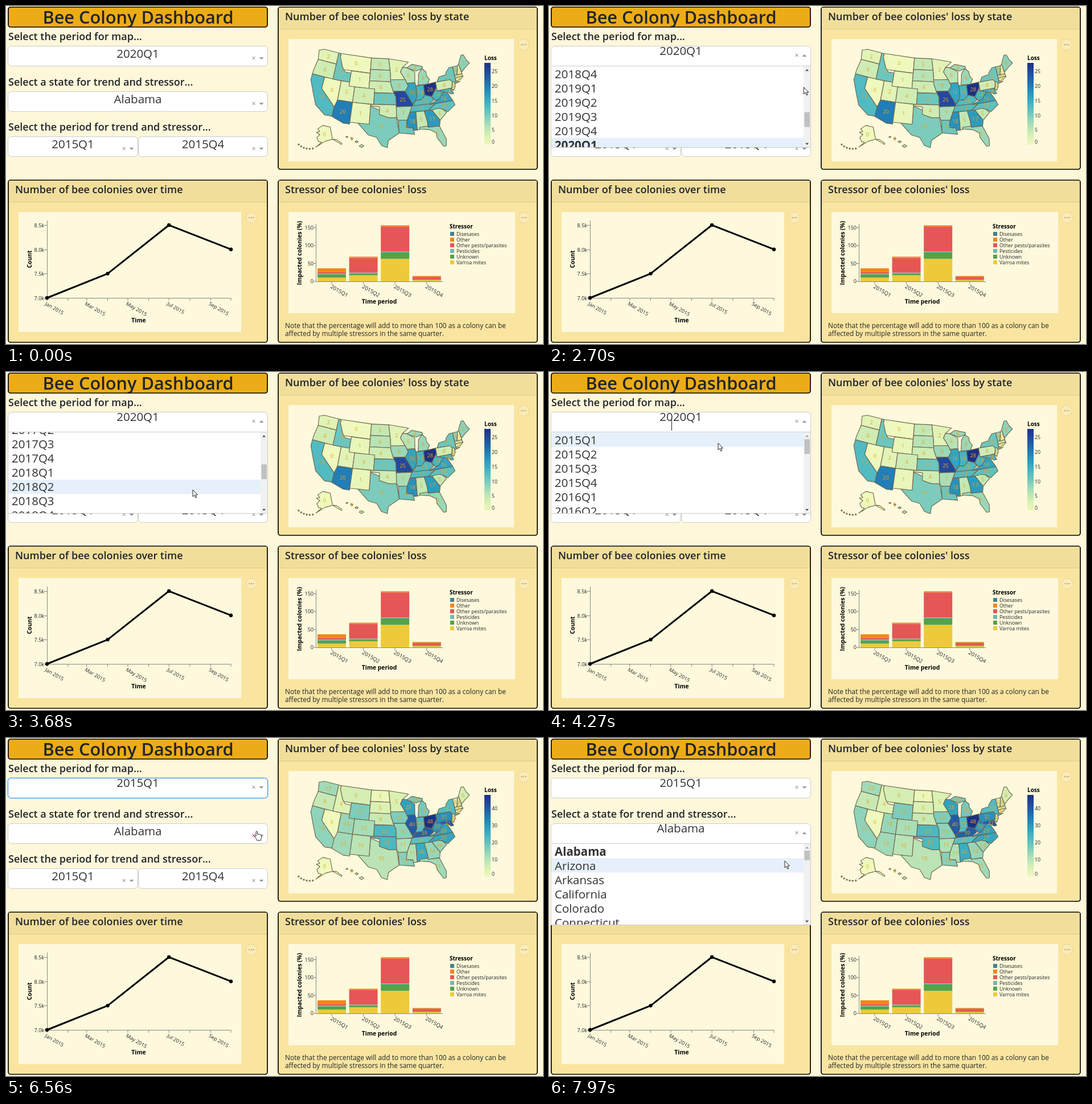
Write an HTML page with a canvas that moves like this. It is 943 px wide and 594 px high and loops after 8 s.

```html
<!DOCTYPE html>
<html lang="en">
<head>
<meta charset="utf-8">
<title>Bee Colony Dashboard</title>
<style>
  html, body { margin: 0; width: 100%; height: 100%; overflow: hidden; background: #fef7da; }
  canvas { display: block; }
</style>
</head>
<body>
<canvas id="stage" width="943" height="594"></canvas>
<script>
const ctx = document.getElementById('stage').getContext('2d');
const FONT = '"Open Sans", "Noto Sans", sans-serif';
const INK = '#212529', PANEL = '#fef9dc', LOOP = 8000;

// Moments of the story, in ms
const OPEN_PERIOD = 1960, PICK_PERIOD = 4600, MAP_OUT = 4650, MAP_IN = 5620, OPEN_STATE = 7150;

// ---------- drawing helpers ----------
function text(str, x, y, size, { weight = 400, color = INK, align = 'left', turn = 0 } = {}) {
  ctx.save();
  ctx.translate(x, y);
  ctx.rotate(turn * Math.PI / 180);
  ctx.font = `${weight} ${size}px ${FONT}`;
  ctx.fillStyle = color;
  ctx.textAlign = align;
  ctx.fillText(str, 0, 0);
  ctx.restore();
}
function rect(x, y, w, h, color) {
  ctx.fillStyle = color;
  ctx.fillRect(x, y, w, h);
}
function paint(fill, stroke, width = 1) {
  ctx.fillStyle = fill;
  ctx.fill();
  ctx.strokeStyle = stroke;
  ctx.lineWidth = width;
  ctx.stroke();
}
function box(x, y, w, h, r, fill, stroke, width) {
  ctx.beginPath();
  ctx.roundRect(x, y, w, h, r);
  paint(fill, stroke, width);
}
function trace(points, closed) {
  ctx.beginPath();
  points.forEach(p => ctx.lineTo(...p));
  if (closed) ctx.closePath();
}
function line(points, color, width = 1) {
  trace(points);
  ctx.strokeStyle = color;
  ctx.lineWidth = width;
  ctx.stroke();
}
function triangle(x, y, w, h, color) {
  trace([[x - w / 2, y - h / 2], [x + w / 2, y - h / 2], [x, y + h / 2]]);
  ctx.fillStyle = color;
  ctx.fill();
}
function dot(x, y, r, color) {
  ctx.beginPath();
  ctx.arc(x, y, r, 0, 7);
  ctx.fillStyle = color;
  ctx.fill();
}

// ---------- map ----------
// Albers equal-area conic; longitudes are degrees west
function conic(lat1, lat2, lon0, lonC, latC, scale, tx, ty) {
  const rad = Math.PI / 180, s1 = Math.sin(lat1 * rad);
  const n = (s1 + Math.sin(lat2 * rad)) / 2, c = 1 - s1 * s1 + 2 * n * s1;
  const raw = (lon, lat) => {
    const rho = Math.sqrt(c - 2 * n * Math.sin(lat * rad)) / n, a = n * (lon0 - lon) * rad;
    return [rho * Math.sin(a), rho * Math.cos(a)];
  };
  const [cx, cy] = raw(lonC, latC);
  return ([lon, lat]) => {
    const [x, y] = raw(lon, lat);
    return [tx + scale * (x - cx), ty + scale * (y - cy)];
  };
}
const K = 386, MX = 674.5, MY = 162.4;
const mainland = conic(29.5, 45.5, 96, 96.6, 38.7, K, MX, MY);
const alaska = conic(55, 65, 154, 156, 58.5, K * .35, MX - .307 * K, MY + .201 * K);
const hawaii = conic(8, 18, 157, 160, 19.9, K, MX - .205 * K, MY + .212 * K);

function centroid(ring) {
  let area = 0, x = 0, y = 0;
  ring.forEach(([x1, y1], i) => {
    const [x2, y2] = ring[(i + 1) % ring.length], cross = x1 * y2 - x2 * y1;
    area += cross;
    x += (x1 + x2) * cross;
    y += (y1 + y2) * cross;
  });
  return [x / area / 3, y / area / 3];
}

// A border runs north to south through lon,lat points; a plain number is a meridian
const border = b => typeof b === 'number' ? [[b, 90], [b, 0]] : b.split(' ').map(p => p.split(',').map(Number));
function crossing(points, lat) {
  const i = points.findIndex(p => p[1] <= lat);
  if (i < 1) return i ? points.at(-1) : points[0];
  const [[x0, y0], [x1, y1]] = points.slice(i - 1, i + 1);
  return [x0 + (x1 - x0) * (lat - y0) / (y1 - y0), lat];
}
const section = (points, north, south) =>
  [crossing(points, north), ...points.filter(p => p[1] < north && p[1] > south), crossing(points, south)];

const states = [];
const addState = (ring, late, early) => states.push({ ring, late, early, label: centroid(ring) });
// Stacks states between two borders; each row gives its southern latitude and losses in both periods
function column(west, east, north, rows, project = mainland) {
  const [w, e] = [west, east].map(border);
  for (const [south, late, early] of rows) {
    addState([...section(w, north, south), ...section(e, north, south).reverse()].map(project), late, early);
    north = south;
  }
}

const PACIFIC = '122.8,49 124.7,48.4 124,46 124.5,43 124.4,40.4 122.5,37.5 120.6,34.5 117.1,32.5';
const SIERRA = '120,42 120,39 114.6,35 114.6,32.6';
const ROCKIES = '116,49 116,48 114.4,45.5 113.3,44.5 111,44.4 111,42';
const PLAINS = '97.2,49 96.5,45 96.4,42.5 95.5,40.5 94.6,39 94.5,33.7 94,33 93.8,29.7';
const RIVER = '89.6,48 92,46.7 92.8,45.5 91.2,43.5 90.2,41.8 91.4,40.4 90.2,38.7 89.1,37 90.2,35 91.2,33 91.6,31.1 89.6,30.9 89.2,29.1';
const LAKE = '90.4,46.6 87.5,45.3 87.8,42.5 87.5,41.7 87.5,39 88.1,37.9 89.1,37';

column(PACIFIC, 117, 49, [[46, 2, 13], [42, 4, 8]]);
column(PACIFIC, SIERRA, 42, [[32.5, 13, 15]]);
column(SIERRA, 114, 42, [[35, 0, 0]]);
column(117, ROCKIES, 49, [[42, 11, 4]]);
column(ROCKIES, 104, 49, [[45, 0, 6]]);
column(114, 109, 42, [[37, 2, 14]]);
column('114,37 114.7,35 114.8,32.5 111,31.3', 109, 37, [[31.3, 20, 13]]);
column(111, 104, 45, [[41, 1, 17]]);
column('103,36.5 103,32.1 106.5,31.8 103,29 100.5,28.5 99,26.4 97.3,25.9', '94.5,33.7 93.8,29.7 97,27.8 97.3,25.9', 36.5, [[25.9, 10, 10]]);
column(104, PLAINS, 49, [[46, 5, 1], [43, 6, 5], [40, 4, 8]]);
column(109, 102, 41, [[37, 4, 12]]);
column(109, 103, 37, [[31.8, 1, 10]]);
column(102, PLAINS, 40, [[37, 11, 23]]);
column('103,37 103,36.6 100,36.4 100,34.5 97,33.7', PLAINS, 37, [[33.7, 4, 23]]);
column(PLAINS, RIVER, 49, [[43.5, 2, 5], [40.5, 8, 17], [36.5, 25, 15], [33, 7, 11], [29.2, 11, 16]]);
column(RIVER, LAKE, 46.7, [[42.5, 6, 28], [37, 16, 40]]);
column('88.5,47.3 90.4,46.5 87,45.5', '88,47.3 84.5,46.5 84.5,46 87,45.5', 47.3, [[45.5, '', 18]].map(([s, a, b]) => [s, 8, b]));
column('85,45.8 86.2,44.7 86.5,43 86.8,41.8', '84.5,45.8 83.4,45 83.4,44 82.5,43 83.4,41.8', 45.8, [[41.8, 8, 18]]);
column('84.8,39.1 86,38 88,37.9 89.4,36.5', '84.8,39.1 82.6,38.4 82,37.5 83.7,36.6', 39.1, [[36.6, 13, 39]]);
column(RIVER, '81.7,36.6 84.3,35', 36.6, [[35, 13, 21]]);
column(LAKE, '84.8,41.7 84.8,39.1 86,38', 41.7, [[38, 14, 22]]);
column('84.8,41.7 84.8,39.1 82.3,38.4', '80.5,42 80.5,40.6 82.2,38.4', 42, [[38.4, 28, 48]]);
column(RIVER, 88.3, 35, [[30.2, 18, 11]]);
column('87.5,31 87.5,30.4 84.5,30 82.8,29 82.7,27.7 81.2,25.2', '85,31 84.9,30.7 81.5,30.6 80.1,27 80.4,25.2', 31, [[25.2, 8, 13]]);
column(88.3, '85.6,35 85,32.3 85,31 87.5,30.9 87.6,30.3', 35, [[30.3, 5, 26]]);
column('81.7,36.5 84.3,35 81,34.9 79.7,34.8 78.2,33.9', '75.9,36.5 75.5,35.3 78.2,33.9', 36.5, [[33.9, 12, 27]]);
column('85.6,35 85,32.3 84.9,30.7', '83.1,35 81,32.1 81.4,30.7', 35, [[30.7, 17, 14]]);
column('83.1,35 81,32.1', '81,35.2 79.7,34.8 78.6,33.8 81,32.1', 35.2, [[32.1, 5, 14]]);
column('78.4,39.4 80.3,37.5 83.7,36.5', '77.5,39.3 77,38.5 75.9,36.5', 39.4, [[36.5, 16, 28]]);
column('80.6,40.6 82.6,38.4 81.5,37.3', '80.5,40.6 80.5,39.7 78,39.5 80.3,37.5 81.5,37.3', 40.6, [[37.3, 14, 30]]);
column(80.5, '75.3,42 74.7,41.4 75.2,40 75.6,39.7', 42, [[39.7, 4, 31]]);
column('79.5,39.7 79.4,39.4 77,38.9 76,38.2', '75.7,39.7 75.1,38.2', 39.7, [[38.2, 14, 41]]);
column('74.8,45 76.2,44 76.5,43.4 79,43.2 79.8,42.2 79.8,42 75.3,41.9 74.5,40.8', '73.4,45 73.4,42 73.6,41 72,40.9 74,40.6', 45, [[40.6, 11, 22]]);
column('74.7,41.3 75.1,40 75.5,39.6 74.9,39', '74,41 74,40 74.9,39', 41.3, [[39, 5, 9]]);
column(73.4, '71.5,45 72.5,42.7', 45, [[42.7, 9, 6]]);
column('71.5,45 72.5,42.7', '71,45.3 70.7,42.7', 45.3, [[42.7, 0, 8]]);
column('70.2,46.3 71,45.3 70.7,43.1', '69.2,47.4 68.3,47.3 67.8,45.8 67,44.8 69,44 70.7,43.1', 47.4, [[43.1, 9, 6]]);
column(73.4, '70.8,42.7 70.6,41.9 71.9,41.3', 42.7, [[42, 5, 8], [41.2, 3, 6]]);
column('156.8,71.3 166.5,68.3 162,66.5 168,65.6 161,64.3 165.5,61.8 162,59 157.5,58.7 164.7,54.6', '156.8,71.3 141,69.6 141,60.3 152,59.5 164.7,54.6', 71.3, [[54.6, 0, 0]], alaska);
column('141,60.3 136.5,58.2 131,54.8', '141,60.3 135.5,59.5 130,55.5', 60.3, [[54.8, 0, 0]], alaska);
// island chains: small diamonds along a curve
const island = (lon, lat, r, project, value, later) =>
  addState([[lon + r, lat], [lon, lat + r * .6], [lon - r, lat], [lon, lat - r * .6]].map(project), value, later);
for (let i = 0; i < 6; i++) island(168 + i * 3.6, 51.8 + (i - 3) ** 2 * .15, .9, alaska, 0, 0);
for (let i = 0; i < 4; i++) island(159.5 - 1.35 * i, 22 - .25 * i - .18 * i * i, .3 + i * i * .04, hawaii, 5, 6);
// one label per state: fragments smaller than this stay blank, apart from the second island of the last chain
const oahu = states.at(-3);
function extent(ring) {
  const xs = ring.map(p => p[0]), ys = ring.map(p => p[1]);
  return Math.min(Math.max(...xs) - Math.min(...xs), Math.max(...ys) - Math.min(...ys));
}
const labelled = states.filter((s, i) => s === oahu || i < states.length - 11 && extent(s.ring) > 5.5);

const RAMP = 'eff9bd dbf1b4 bde5b5 94d5b9 69c5be 45b4c2 2c9ec0 2182b8 2163aa 23479c 1c3185'.split(' ');
const channels = hex => [0, 2, 4].map(i => parseInt(hex.slice(i, i + 2), 16));
function ramp(u) {
  const p = u * (RAMP.length - 1), i = Math.min(Math.floor(p), RAMP.length - 2);
  const a = channels(RAMP[i]), b = channels(RAMP[i + 1]);
  return `rgb(${a.map((v, k) => Math.round(v + (b[k] - v) * (p - i)))})`;
}

function drawMap(key, max, step) {
  rect(496, 58, 396, 215, PANEL);
  ctx.lineJoin = 'round';
  for (const s of states) {
    trace(s.ring, true);
    paint(ramp(s[key] / max), '#6f6248', 1.1);
  }
  for (const s of labelled) text(s[key], s.label[0], s.label[1] + 3.5, 9.3, { color: '#e9a51e', align: 'center' });

  text('Loss', 840, 95, 10, { weight: 700, color: '#000' });
  const g = ctx.createLinearGradient(0, 244, 0, 100);
  RAMP.forEach((c, i) => g.addColorStop(i / (RAMP.length - 1), '#' + c));
  rect(840, 100, 11, 144, g);
  for (let v = 0; v <= max; v += step) text(v, 853, Math.min(244 - v / max * 144, 239) + 3, 8.8);
  menuDots(909, 68);
}

// ---------- cards and charts ----------
function menuDots(x, y) {
  ctx.globalAlpha = .4;
  ctx.beginPath();
  ctx.arc(x, y, 9.5, 0, 7);
  paint('#fff5d5', '#c8b88a');
  for (const dx of [-3.7, 0, 3.7]) dot(x + dx, y, 1.3, '#6b6450');
  ctx.globalAlpha = 1;
}
function card(x, y, title) {
  box(x + 1, y + 1, 455, 285, 4, '#fae5a0', '#000', 1.7);
  rect(x + 2, y + 2, 453, 37, '#f2de9b');
  rect(x + 2, y + 39, 453, 1, '#dccb8e');
  text(title, x + 13, y + 23.5, 18, { weight: 600 });
}

const AXIS = '#888', bold = { weight: 700, color: '#000', align: 'center' };
function drawTrend() {
  card(3, 305, 'Number of bee colonies over time');
  rect(22, 362, 391, 211, PANEL);
  line([[72.5, 377], [72.5, 513.5], [395, 513.5]], AXIS);
  ['7.0k', '7.5k', '8.0k', '8.5k'].forEach((label, i) => {
    const y = 513.5 - Math.round(i * 42.7);
    line([[67, y], [72, y]], AXIS);
    text(label, 67, y + 3, 9, { align: 'right' });
  });
  const monthX = m => 72 + (Date.UTC(2015, m) - Date.UTC(2015, 0)) / 864e5 * 323 / 273;
  'Jan,,Mar,,May,,Jul,,Sep,'.split(',').forEach((name, m) => {
    const x = monthX(m);
    line([[x, 513], [x, 518]], AXIS);
    if (name) text(name + ' 2015', x - 4, 525, 9, { turn: 30 });
  });
  const points = [7, 7.5, 8.5, 8].map((v, q) => [monthX(q * 3), 513 - (v - 7) * 85.3]);
  line(points, '#000', 3);
  points.forEach(p => dot(...p, 3.2, '#000'));
  text('Count', 45, 445, 10.3, { ...bold, turn: -90 });
  text('Time', 233, 556, 10.3, bold);
  menuDots(431, 372);
}

// name, colour and share of bees hit in each quarter, in percent
const STRESSORS = [
  ['Disesases', '#48808f', 0, 0, 0, .5],
  ['Other', '#f58518', 10, 3.5, 3, 2],
  ['Other pests/parasites', '#e45756', 5, 41, 70, 7.5],
  ['Pesticides', '#72b7b2', 1.5, 2.5, 2.5, .5],
  ['Unknown', '#54a24b', 9.5, 5, 18, 1],
  ['Varroa mites', '#eeca3b', 10.5, 17, 63, 3.5]];
function drawStressors() {
  card(477, 305, "Stressor of bee colonies' loss");
  rect(496, 362, 398, 178, PANEL);
  for (let q = 0; q < 4; q++) {
    const x = 547 + q * 55.6;
    let y = 484;
    for (const [, color, ...shares] of [...STRESSORS].reverse()) {
      const h = shares[q] * .63;
      y -= h;
      rect(x, y, 50, h, color);
    }
    line([[x + 25, 484], [x + 25, 489]], AXIS);
    text('2015Q' + (q + 1), x + 22, 495, 9.3, { turn: 30 });
  }
  line([[544.5, 383], [544.5, 484.5], [767, 484.5]], AXIS);
  for (let v = 0; v <= 150; v += 50) {
    const y = 484 - v * .63;
    line([[540, y], [545, y]], AXIS);
    text(v, 540, y + 3, 9, { align: 'right' });
  }
  text('Impacted colonies (%)', 519, 434, 10.3, { ...bold, turn: -90 });
  text('Time period', 655.5, 523, 10.3, bold);
  text('Stressor', 779, 391, 10, { weight: 700, color: '#000' });
  STRESSORS.forEach(([name, color], i) => {
    rect(780, 397 + i * 10, 7, 7, color);
    text(name, 791, 404 + i * 10, 8.8);
  });
  text('Note that the percentage will add to more than 100 as a colony can be', 490, 566, 11.9);
  text('affected by multiple stressors in the same quarter.', 490, 580, 11.9);
  menuDots(910, 372);
}

// ---------- dropdowns ----------
const PERIODS = Array.from({ length: 26 }, (_, i) => `${2015 + (i >> 2)}Q${i % 4 + 1}`);
const STATE_NAMES = ['Alabama', 'Arizona', 'Arkansas', 'California', 'Colorado', 'Connecticut'];

function select(x, y, w, value, { shifted, open, focus, pointer } = {}) {
  const up = shifted ? 5 : 0, right = x + w;
  if (focus) box(x + .5, y + .5, w - 1, 35, 6, '#fff', '#cfe6f5', 4);
  box(x + .5, y + .5, w - 1, 35, open ? [6, 6, 0, 0] : 6, '#fff', focus ? '#3a8fdc' : '#ccc');
  text(value, x + w / 2, y + 20.5 - up, 20.5, { color: '#333', align: 'center' });
  const over = pointer && pointer[1] > y && pointer[1] < y + 36;
  const onClear = over && Math.abs(pointer[0] - right + 21) < 5;
  const cy = y + 22 - up;
  text('×', right - 25, cy + 4, 12.5, { color: onClear ? '#d0306a' : '#8a9080', align: 'center' });
  triangle(right - 11.5, cy, 8, open ? -4 : 4, over && !onClear ? '#555' : '#999');
}

function menu(top, options, count, scroll, selected, pointer) {
  const ROW = 25, H = 142, offset = top + .5 - scroll;
  ctx.save();
  ctx.beginPath();
  ctx.rect(3, top, 457, H + 1);
  ctx.clip();
  rect(3, top, 457, H + 1, '#fff');
  const inside = pointer[0] > 3 && pointer[0] < 447 && pointer[1] > top && pointer[1] < top + H;
  const hover = inside ? Math.floor((pointer[1] - offset) / ROW) : selected;
  options.forEach((label, i) => {
    const y = offset + i * ROW;
    if (i === hover) rect(4, y, 443, ROW, '#e5f0fc');
    text(label, 10, y + 20, 20.5, { weight: i === selected ? 700 : 400, color: '#333' });
  });
  const track = H - 23, thumb = track * H / (count * ROW);
  rect(447, top, 12, H, '#f1f1f1');
  rect(448.5, top + 12 + scroll / (count * ROW - H) * (track - thumb), 9.5, thumb, '#c1c1c1');
  triangle(453, top + 6.5, 6, -3.5, scroll ? '#505050' : '#a3a3a3');
  triangle(453, top + H - 5.5, 6, 3.5, '#505050');
  ctx.restore();
  line([[3.5, top], [3.5, top + H + .5], [459.5, top + H + .5], [459.5, top]], '#ccc');
}

function textCaret(y, since) {
  if (since % 1060 < 530) rect(215, y, 1, 20, '#222');
}

// ---------- pointer ----------
// each trip: start and end time, then where it leads
const TRIPS = [[985, 1410, 505, 60], [1410, 1550, 462, 109], [1550, 1760, 449, 90], [2490, 2910, 446, 195],
  [3050, 3340, 328, 207], [3870, 4270, 297, 125], [4620, 5210, 447, 178], [6150, 6560, 439, 163],
  [6600, 6830, 446, 166], [7250, 7900, 414, 216]];
const progress = (t, from, to) => Math.min(Math.max((t - from) / (to - from), 0), 1);
const pointerAt = t => TRIPS.reduce(([x, y], [from, to, tx, ty]) => {
  const u = progress(t, from, to);
  return [x + (tx - x) * u, y + (ty - y) * u];
}, [945, 548]);
const ARROW = new Path2D('M0 0V12L2.8 9.5 4.8 14 6.8 13.2 4.8 8.8H8.5Z');
const HAND = new Path2D('M0 1.5Q1.2-.5 2.5 1.5V6Q4 5 5 6.5 6.5 5.5 7.5 7 9.5 6.5 9.7 8.5V12Q9.5 14 8.2 15.5V17H1.5V15.5L-3 10Q-2.5 8 0 9.8Z');
const overControl = (x, y) => x > 425 && x < 459 && (y > 70 && y < 106 || y > 150 && y < 186);
function drawPointer([x, y], waiting) {
  const hand = overControl(x, y), shape = hand ? HAND : ARROW, pale = hand && waiting;
  ctx.save();
  ctx.translate(x, y);
  ctx.lineWidth = 1;
  ctx.fillStyle = pale ? '#fbeab5' : '#fff';
  ctx.strokeStyle = pale ? '#ecd07a' : '#222';
  ctx.fill(shape);
  ctx.stroke(shape);
  ctx.restore();
}

// ---------- scene ----------
function draw(t) {
  const pointer = pointerAt(t);
  const periodOpen = t >= OPEN_PERIOD && t < PICK_PERIOD, picked = t >= PICK_PERIOD, stateOpen = t >= OPEN_STATE;
  rect(0, 0, 943, 594, '#fef7da');

  box(4, 2, 455, 35, 4, '#ecac17', '#000', 1.7);
  text('Bee Colony Dashboard', 232, 31, 30.7, { weight: 600, align: 'center' });
  ['map', 'state', 'trend'].forEach((_, i) => text(
    ['Select the period for map...', 'Select a state for trend and stressor...', 'Select the period for trend and stressor...'][i],
    4, 60 + i * 79.7, 18, { weight: 600 }));

  select(3, 70, 457, picked ? '2015Q1' : '2020Q1',
    { shifted: t >= OPEN_PERIOD, open: periodOpen, focus: picked && !stateOpen, pointer });
  select(3, 150, 457, 'Alabama', { shifted: stateOpen, open: stateOpen, pointer });
  select(3, 229, 229, '2015Q1');
  select(232, 229, 228, '2015Q4');

  card(477, 1, "Number of bee colonies' loss by state");
  if (t < MAP_OUT) drawMap('late', 28, 5);
  else if (t >= MAP_IN) drawMap('early', 48, 10);
  drawTrend();
  drawStressors();

  if (periodOpen) {
    const u = progress(t, 3400, 4100);
    menu(106, PERIODS, PERIODS.length, 375 * (1 - u * u * (3 - 2 * u)), 20, pointer);
    textCaret(83, t - OPEN_PERIOD);
  }
  if (stateOpen) {
    menu(186, STATE_NAMES, 40, 0, 0, pointer);
    textCaret(163, t - OPEN_STATE);
  }
  drawPointer(pointer, t < MAP_IN + 530 && picked);
}

function tick() {
  draw(performance.now() % LOOP);
  requestAnimationFrame(tick);
}
tick();
</script>
</body>
</html>
```
